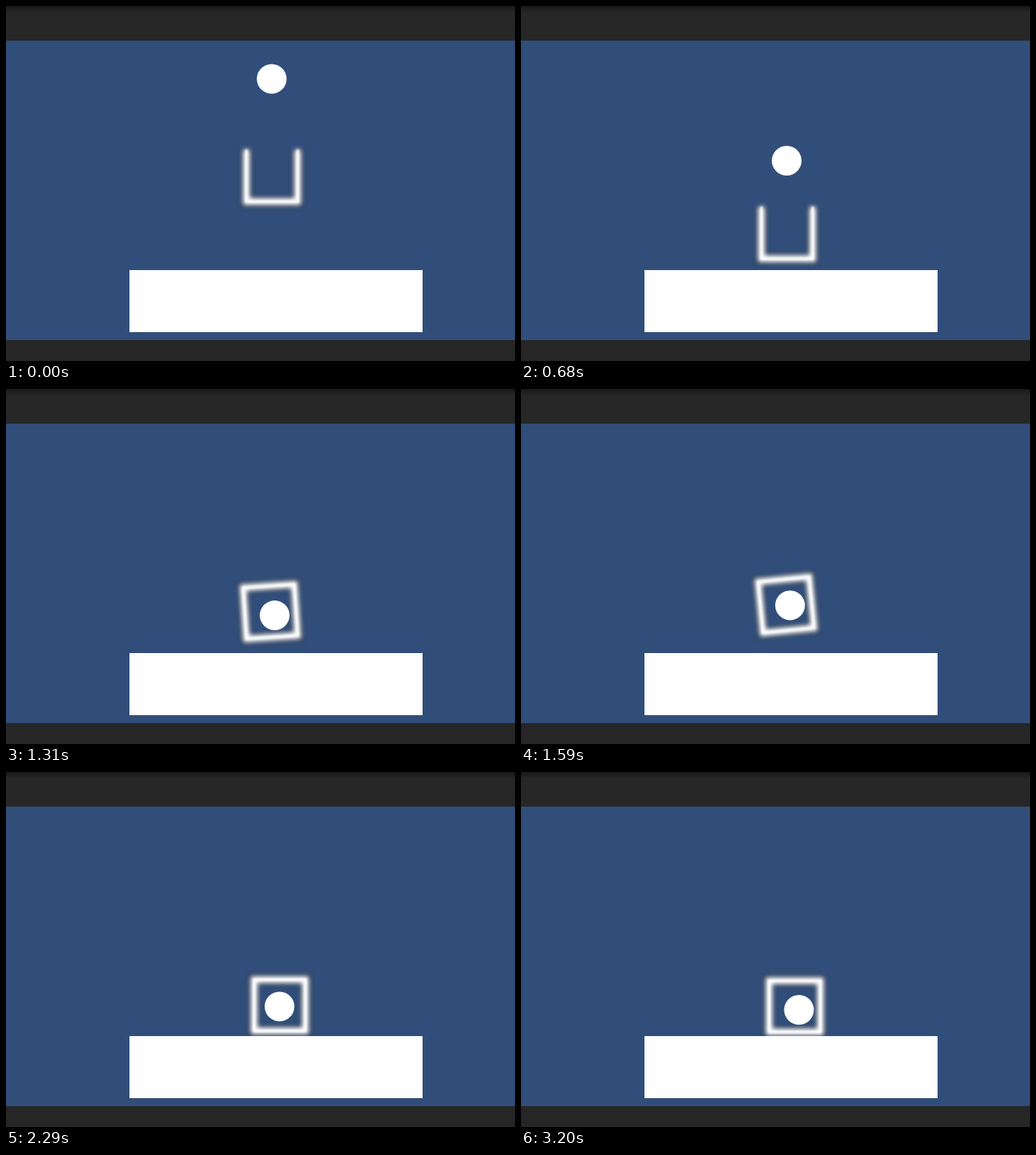
Write an HTML page that moves like this. It is 705x492 px and loops after 3.26 s.

```html
<!DOCTYPE html>
<html lang="en">
<head>
<meta charset="utf-8">
<title>Ball in a box</title>
<style>
  html, body { margin: 0; width: 100%; height: 100%; overflow: hidden; background: #304e79; }
  svg { display: block; width: 705px; height: 492px; }
  .frame path { fill: none; stroke-linejoin: miter; }
  .halo { stroke: #29374f; stroke-width: 17; opacity: .8; filter: url(#wide); }
  .glow { stroke: #fff; stroke-width: 9.5; filter: url(#soft); }
  .core { stroke: #fff; stroke-width: 2.6; filter: url(#fine); }
</style>
</head>
<body>
<svg viewBox="0 0 705 492">
  <defs>
    <linearGradient id="bar" x1="0" y1="0" x2="0" y2="1">
      <stop offset="0" stop-color="#191919"/>
      <stop offset=".2" stop-color="#272727"/>
    </linearGradient>
    <filter id="wide" filterUnits="userSpaceOnUse" x="-70" y="-70" width="140" height="140" color-interpolation-filters="sRGB"><feGaussianBlur stdDeviation="2.4"/></filter>
    <filter id="soft" filterUnits="userSpaceOnUse" x="-70" y="-70" width="140" height="140" color-interpolation-filters="sRGB"><feGaussianBlur stdDeviation="3"/></filter>
    <filter id="fine" filterUnits="userSpaceOnUse" x="-70" y="-70" width="140" height="140" color-interpolation-filters="sRGB"><feGaussianBlur stdDeviation=".8"/></filter>
  </defs>
  <rect width="705" height="492" fill="#304e79"/>
  <g class="frame" id="box">
    <path class="halo"/><path class="glow"/><path class="core"/>
  </g>
  <circle id="ball" r="20.6" fill="#fff"/>
  <rect x="171" y="366" width="406" height="86" fill="#fefefe"/>
  <rect width="705" height="48" fill="url(#bar)"/>
  <rect y="463" width="705" height="29" fill="#262626"/>
</svg>
<script>
const LOOP = 3260, HOLD = 330, STEP = 70, LAST = 42;
const G = 6.3;                 // gravity, px per step squared
const TOP = 235.5, REST = 324.7, HALF = 35.5;
const CAUGHT = 8;              // the ball reaches the box, then the lid closes
const HOP = 5.35, SMALL_HOP = 3, FADE = 0.785;

const fall = n => G / 2 * n * n;

function ease(n, from, to) {
  const u = Math.min(1, Math.max(0, (n - from) / (to - from)));
  return u * u * (3 - 2 * u);
}

// Height above the floor: even hops while the ball rattles hard, then fading ones.
function hopHeight(n, land) {
  let hop = HOP;
  while (n >= land + hop) {
    land += hop;
    if (land > 20) hop = Math.min(SMALL_HOP, hop * FADE);
    if (hop < 0.5) return 0;
  }
  return G / 2 * (n - land) * (land + hop - n);
}

function boxPose(n) {
  const land = Math.sqrt(2 * (REST - TOP) / G);
  const swing = Math.min(1, Math.max(0, (n - 11) / 17));
  const tilt = 5.6 * Math.sin(Math.PI * swing);
  const rad = tilt * Math.PI / 180;
  const lift = HALF * (Math.cos(rad) + Math.sin(rad) - 1);   // standing on a corner
  return {
    x: 368.5 - 2.3 * ease(n, 8, 11) + 13 * ease(n, 17, 29),
    y: n < land ? TOP + fall(n) : REST - lift - hopHeight(n, land),
    angle: -tilt
  };
}

function ballPose(n, box) {
  const t = n - 11;
  const rattle = 8.2 * Math.exp(-0.04 * t) * Math.cos(Math.PI * t / 9.3) ** 2;
  return {
    x: 368 + 4.7 * ease(n, 8, 17) + 12.3 * ease(n, 22, 36),
    y: n <= CAUGHT ? 101 + fall(n) : box.y + 5.5 - rattle
  };
}

const boxNode = document.getElementById('box');
const ballNode = document.getElementById('ball');
const OPEN = `M${-HALF} -36.5V${HALF}H${HALF}V-36.5`;
const CLOSED = `M${-HALF} ${-HALF}V${HALF}H${HALF}V${-HALF}Z`;

function draw(n) {
  const box = boxPose(n), ball = ballPose(n, box);
  boxNode.setAttribute('transform', `translate(${box.x} ${box.y}) rotate(${box.angle})`);
  const shape = n <= CAUGHT ? OPEN : CLOSED;
  for (const path of boxNode.children) path.setAttribute('d', shape);
  ballNode.setAttribute('cx', ball.x);
  ballNode.setAttribute('cy', ball.y);
}

const start = performance.now();
function tick() {
  const t = (performance.now() - start) % LOOP;
  draw(t < HOLD ? 0 : Math.min(LAST, Math.floor((t - HOLD) / STEP) + 1));
  requestAnimationFrame(tick);
}
tick();
</script>
</body>
</html>
```
